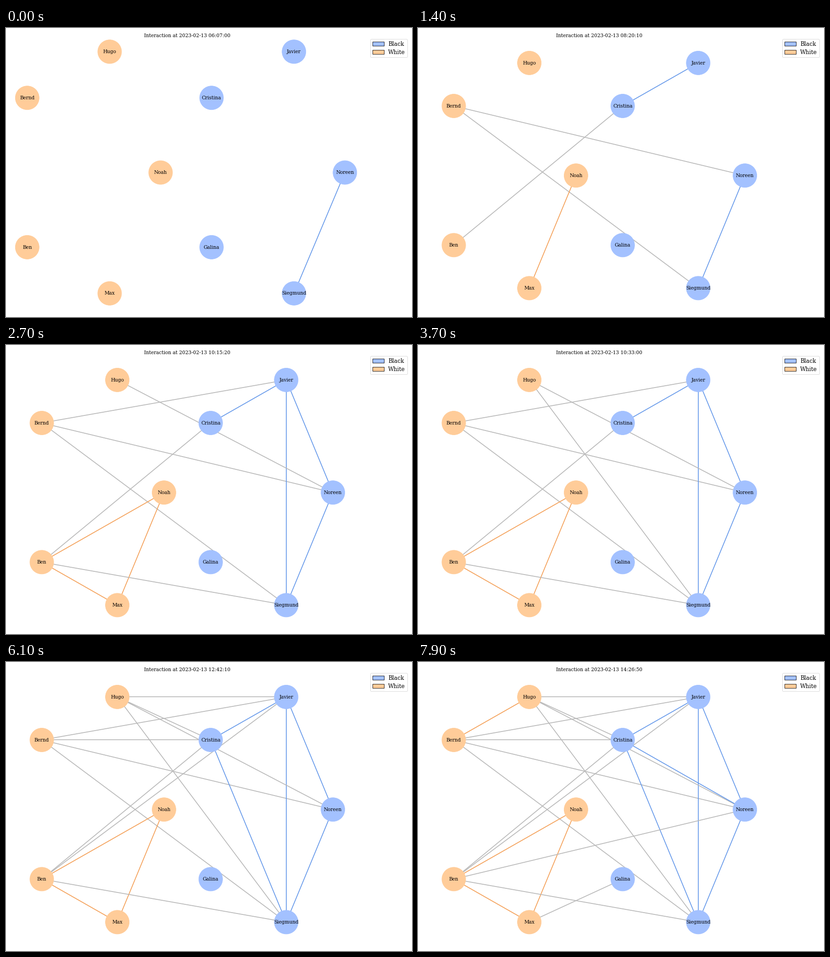
These frames come from a looping animation (885 px wide and 632 px high, 8000 ms). A matplotlib script:

```python
import numpy as np
import matplotlib.pyplot as plt
from matplotlib.animation import FuncAnimation
from matplotlib.collections import LineCollection
from matplotlib.patches import Patch

W, H = 885, 632
FRAMES, INTERVAL = 80, 100
BLUE, ORANGE = "#a3c1ff", "#ffcc99"
BLUE_EDGE, ORANGE_EDGE, MIXED_EDGE = "#6699ea", "#f4a058", "#b9b9b9"

WHITE = ["Noah", "Hugo", "Bernd", "Ben", "Max"]
BLACK = ["Noreen", "Javier", "Cristina", "Galina", "Siegmund"]

# (first frame shown, person, person)
MEETINGS = [
    (0, "Noreen", "Siegmund"),
    (4, "Bernd", "Noreen"),
    (6, "Bernd", "Siegmund"),
    (10, "Cristina", "Ben"),
    (12, "Javier", "Cristina"),
    (13, "Noah", "Max"),
    (16, "Javier", "Siegmund"),
    (17, "Ben", "Siegmund"),
    (18, "Noah", "Ben"),
    (20, "Bernd", "Javier"),
    (22, "Javier", "Noreen"),
    (24, "Ben", "Max"),
    (26, "Hugo", "Noreen"),
    (32, "Hugo", "Siegmund"),
    (50, "Cristina", "Siegmund"),
    (51, "Ben", "Javier"),
    (53, "Bernd", "Cristina"),
    (57, "Hugo", "Javier"),
    (59, "Hugo", "Cristina"),
    (67, "Max", "Galina"),
    (70, "Cristina", "Noreen"),
    (75, "Ben", "Noreen"),
    (77, "Hugo", "Bernd"),
]

# Clock waypoints: frame -> hours, minutes, seconds
CLOCK = {0: (6, 7, 0), 8: (8, 3, 30), 14: (8, 20, 10), 27: (10, 15, 20),
         48: (10, 52, 20), 61: (12, 42, 10), 79: (14, 26, 50)}
CLOCK_FRAMES = list(CLOCK)
CLOCK_SECONDS = [h * 3600 + m * 60 + s for h, m, s in CLOCK.values()]


def ring(names, cx):
    angles = 2 * np.pi * np.arange(len(names)) / len(names)
    return {n: (cx + np.cos(a), np.sin(a)) for n, a in zip(names, angles)}


def edge_color(a, b):
    if (a in WHITE) != (b in WHITE):
        return MIXED_EDGE
    return ORANGE_EDGE if a in WHITE else BLUE_EDGE


def clock_text(i):
    t = 10 * round(np.interp(i, CLOCK_FRAMES, CLOCK_SECONDS) / 10)
    return f"{t // 3600:02d}:{t // 60 % 60:02d}:{t % 60:02d}"


def view_limits(segments):
    """Bounds of all nodes and of the padded edges, plus a 5% margin."""
    ends = np.array(segments).reshape(-1, 2)
    lo, hi = ends.min(axis=0), ends.max(axis=0)
    pad = 0.05 * (hi - lo)
    lo = np.minimum(nodes.min(axis=0), lo - pad)
    hi = np.maximum(nodes.max(axis=0), hi + pad)
    margin = 0.05 * (hi - lo)
    return lo - margin, hi + margin


pos = {**ring(WHITE, 0), **ring(BLACK, 2.5)}
nodes = np.array(list(pos.values()))

plt.rcParams["font.family"] = "DejaVu Serif"
fig = plt.figure(figsize=(14, 10), dpi=63.2143, facecolor="white")
left, right, top, bottom = 11.38, 779.2, 24.85, 620.62
ax = fig.add_axes([left / W, 1 - bottom / H, (right - left) / W, (bottom - top) / H])
ax.axis("off")

edges = LineCollection([], linewidths=2, zorder=1, clip_on=False)
ax.add_collection(edges, autolim=False)
ax.scatter(*nodes.T, s=3500, c=[ORANGE] * len(WHITE) + [BLUE] * len(BLACK),
           linewidths=1, zorder=2, clip_on=False)
for name, (x, y) in pos.items():
    ax.text(x, y, name, fontsize=12, ha="center", va="center", zorder=3)
title = ax.set_title("", fontsize=12, pad=6)

fig.legend(handles=[Patch(facecolor=BLUE, edgecolor="black", label="Black"),
                    Patch(facecolor=ORANGE, edgecolor="black", label="White")],
           loc="upper left", bbox_to_anchor=(794.4 / W, 1 - 24.6 / H),
           borderaxespad=0, borderpad=0.37, labelspacing=0.37, fontsize=14)


def draw(i):
    met = [(a, b) for start, a, b in MEETINGS if start <= i]
    segments = [(pos[a], pos[b]) for a, b in met]
    edges.set_segments(segments)
    edges.set_color([edge_color(a, b) for a, b in met])
    (x0, y0), (x1, y1) = view_limits(segments)
    ax.set_xlim(x0, x1)
    ax.set_ylim(y0, y1)
    title.set_text(f"Interaction at 2023-02-13 {clock_text(i)}")
    return edges, title


anim = FuncAnimation(fig, draw, frames=FRAMES, interval=INTERVAL,
                     repeat=True, repeat_delay=0, blit=False)
plt.show()
```
